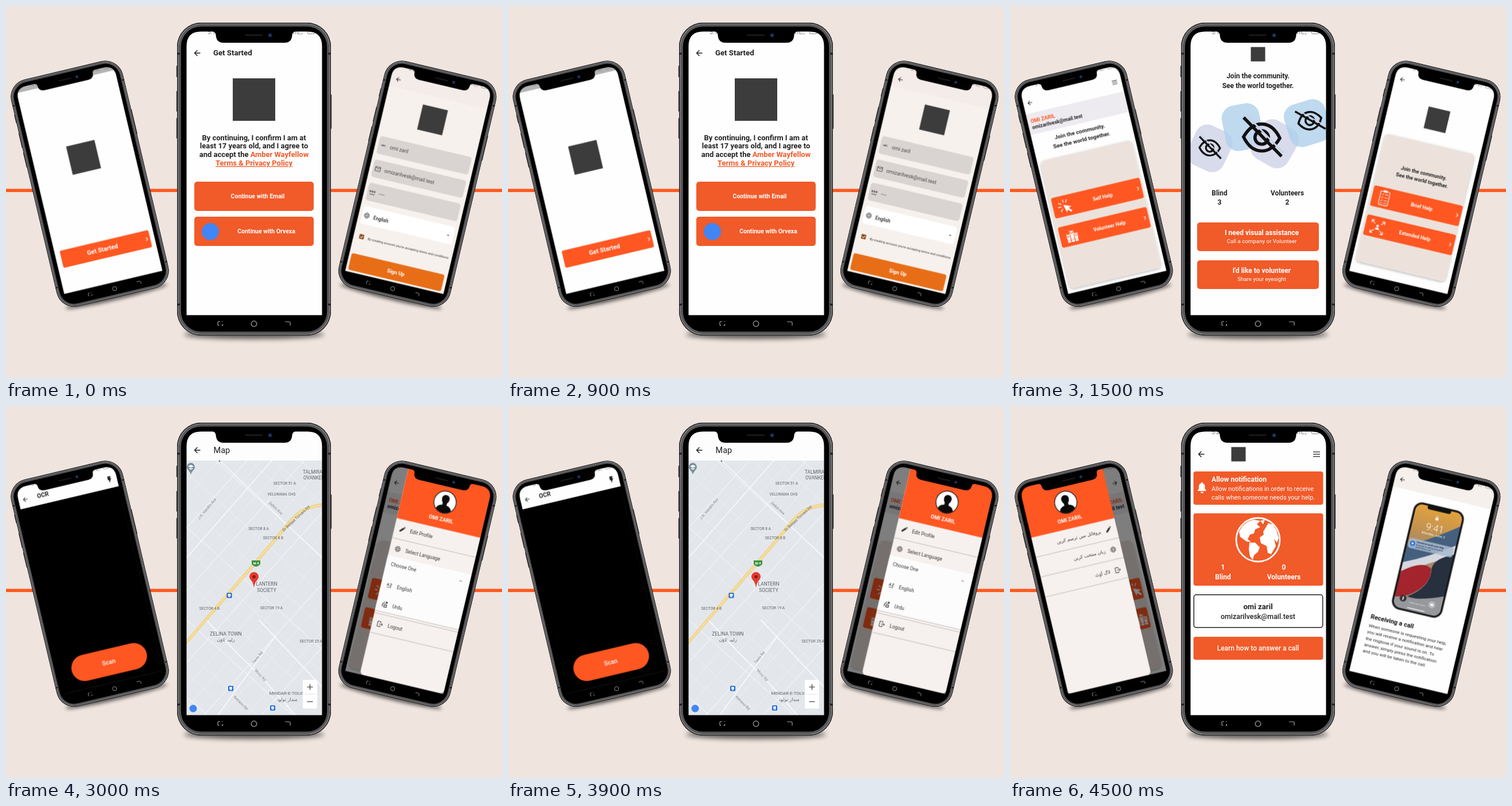
Recreate the animation shown at these times as an HTML page. Size 864 by 648 pixels, loop 6000 ms.

```html
<!DOCTYPE html>
<html lang="en">
<head>
<meta charset="utf-8">
<title>App screens</title>
<style>
html,body{margin:0;width:100%;height:100%;overflow:hidden;background:#efe4de}
svg{display:block;width:100vw;height:100vh;font-family:Roboto,sans-serif}
.page{opacity:0;animation:turn 6s step-end infinite}
@keyframes turn{0%{opacity:1}25%{opacity:0}100%{opacity:0}}
</style>
</head>
<body>
<svg id="stage" viewBox="0 0 864 648" xmlns="http://www.w3.org/2000/svg"></svg>
<script>
const ORANGE = '#f15a29', DEEP = '#ff5722', INK = '#222', LOGO = '#3c3c3c';
const NAME = 'omi zaril', MAIL = 'omizarilvesk@mail.test';

// y is the middle of the line of text
const T = (x, y, s, z, c = INK, w = 400, a = 'middle', more = '') =>
  `<text x="${x}" y="${y}" dy=".355em" font-size="${z}" fill="${c}" font-weight="${w}" text-anchor="${a}" ${more}>${s}</text>`;
const L = (x, y, s, z, c, w) => T(x, y, s, z, c, w, 'start');
const R = (x, y, w, h, c, r = 0, more = '') =>
  `<rect x="${x}" y="${y}" width="${w}" height="${h}" rx="${r}" fill="${c}" ${more}/>`;
const C = (x, y, r, c, more = '') => `<circle cx="${x}" cy="${y}" r="${r}" fill="${c}" ${more}/>`;
const P = (d, c = INK, w = 1.4, more = '') => `<path d="${d}" fill="none" stroke="${c}" stroke-width="${w}" ${more}/>`;
const F = (d, c, more = '') => `<path d="${d}" fill="${c}" ${more}/>`;
const G = (tr, s) => `<g transform="${tr}">${s}</g>`;
const at = (x, y, s) => G(`translate(${x} ${y})`, s);
const SQ = (x, y, s) => R(x - s / 2, y - s / 2, s, s, LOGO);

const arrow = (x, y, d = 1) => at(x, y, G(`scale(${d} 1)`, P('M5.5 0H-4.5M.5-5L-4.5 0 .5 5', INK, 1.4)));
const burger = (x, y) => P(`M${x - 6} ${y - 4}h12m-12 4h12m-12 4h12`, '#444', 1.5);
const chev = (x, y) => P(`M${x - 2} ${y - 4}l4 4-4 4`, '#fff', 1.5);
const status = s => L(351, 45, s, 10, '#777') + L(500, 45, 'm', 10, '#777') + L(509, 48, 'K/s', 5, '#777') +
  R(525, 41, 13, 7.5, 'none', 2, 'stroke="#888"');

const globe = (x, y, c = '#333') => at(x, y, C(0, 0, 6, 'none', `stroke="${c}"`) +
  `<ellipse rx="2.6" ry="6" fill="none" stroke="${c}"/>` + P('M-5.6-2H5.6M-5.6 2H5.6', c, 1));
const pencil = (x, y) => at(x, y, F('M-6 6V3L2-5 5-2-3 6zM3-6L4.5-7.2 7-4.6 5.9-3z', '#333'));
const exit = (x, y) => at(x, y, P('M1-3V-6H-6V6H1V3M-2 0H6M3-3L6 0 3 3', '#333', 1.3));

const cursor = at(-1, 0, F('M-3-3L15 4 8 7 15 14 12 17 5 10 2 16z', '#fff') +
  P('M-7-5l-7-4M-2-8v-7M-8 1h-8M-6 6l-5 6M3-7l4-7', '#fff', 1.8));
const crowd = [[-9, 2], [0, -5], [9, 2]].map(([x, y]) => C(x, y - 3, 2.6, '#fff') +
  F(`M${x - 3.5} ${y + 1}h7V16h-7z`, '#fff') + P(`M${x - 3.7} ${y + 3}v-10M${x + 3.7} ${y + 3}v-9`, '#fff', 1.2)).join('') +
  P('M-13 11H13', DEEP, .8);
const list = R(-11, -15, 22, 32, 'none', 3, 'stroke="#fff" stroke-width="1.4"') + R(-5, -18, 10, 5, '#fff', 2) +
  [-8, -1, 6, 12].map(y => P(`M-8 ${y}l2 2 3-4M0 ${y}h8`, '#fff', 1.3)).join('');
const expand = C(0, -3, 3, '#fff') + F('M-5 6q0-5 5-5t5 5z', '#fff') +
  [0, 90, 180, 270].map(a => G(`rotate(${a})`, P('M7-7l8-8M9-15h6v6', '#fff', 1.7))).join('');

// Orange row with an icon and a chevron
const row = (y, s, icon, rtl) => R(326, y - 24.5, 213, 49, DEEP, 5) + at(rtl ? 522 : 355, y, icon) +
  T(445, y, s, 11.6, '#fff', 700) + (rtl ? '' : chev(530, y));
const card = (x, y, w, h) => R(x, y, w, h, '#ece2db', 10, 'filter="url(#soft)"');
const slogan = (x, y, z, gap) => T(x, y, 'Join the community.', z, INK, 700) +
  T(x, y + gap, 'See the world together.', z, INK, 700);

function home(rtl) {
  const a = rtl ? 'end' : 'start', x = rtl ? 543 : 322;
  return status('5:1') + R(314, 107, 237, 50, '#eeebf0') + (rtl ? arrow(534, 84, -1) : arrow(330, 83) + burger(534, 82)) +
    T(x, 126, NAME.toUpperCase(), 12, DEEP, 700, a) + T(x, 140, MAIL, 11.4, INK, 700, a) +
    slogan(428, 175, 13.2, 20.5) + card(321, 222, 220, 306) +
    row(336, 'Self Help', cursor, rtl) + row(406.5, 'Volunteer Help', crowd, rtl);
}

const shade = R(314, 44, 237, 495, '#000', 0, 'opacity=".5"');
const rule = (x, y) => P(`M${x} ${y}h200`, '#77706d', .6);
const drawer = (x, cx, s) => R(x, 30, 201, 509, '#f6f1ef', 10) + R(x, 30, 201, 133, DEEP) +
  at(cx, 101, C(0, 0, 26, '#fff', 'stroke="#111" stroke-width="1.6"') +
    F('M-18 18Q-16 9-5 7V2Q-9-2-9-8-8-17 0-17T9-8Q9-2 5 2V7Q16 9 18 18A25 25 0 0 1-18 18z', '#0b0b0b')) +
  T(cx, 142, NAME.toUpperCase(), 12, '#fff', 700) + s;

/* first set */
const field = (y, c = '#d9d4d1') => R(322, y - 21, 220, 42, c, 6);
const start = R(314, 44, 237, 12, '#b5b3b3') + status('5:1') + SQ(432, 238, 68) +
  R(327, 438, 213, 41, DEEP, 4) + T(425.5, 458, 'Get Started', 14.4, '#fff', 700) + chev(532, 458);
const consent = status('5:1') + arrow(333, 82) + L(361, 81.5, 'Get Started', 13.2, INK, 700) + SQ(432, 163, 74) +
  ['By continuing, I confirm I am at', 'least 17 years old, and I agree to',
   `and accept the <tspan fill="${ORANGE}">Amber Wayfellow</tspan>`,
   `<tspan fill="${ORANGE}" text-decoration="underline">Terms &amp; Privacy Policy</tspan>`]
    .map((s, i) => T(432, 229 + i * 14.8, s, 12.95, INK, 700)).join('') +
  R(328, 306, 208, 51, ORANGE, 5) + T(438.5, 331.5, 'Continue with Email', 10.5, '#fff', 700) +
  R(328, 367, 208, 51, ORANGE, 5) + C(356, 393, 15, '#4285f4') + T(453.5, 392.5, 'Continue with Orvexa', 10.5, '#fff', 700);
const signup = R(314, 44, 237, 495, '#f6f1ed') + R(314, 44, 237, 50, '#f4ece9') + status('5:1') + arrow(332.6, 74.5) + SQ(432, 148, 60) +
  field(233) + T(334, 232, 'ABC', 5.5, '#444', 700) + L(350, 233.5, NAME, 11.6, '#444') +
  field(289) + P('M328 284.500h12v9.500h-12zl6 5 6-5', '#444', 1.3) + L(350, 290, MAIL, 11.6, '#444') +
  field(345) + T(334, 346, '***', 11, '#333', 700) + P('M328 350h12', '#333', 1.3) + L(350, 345.5, '•••••', 8, '#333') +
  field(401, '#fff') + globe(334, 401) + L(350, 402, 'English', 11, INK, 500) + F('M526 401h7l-3.500 3.500z', '#777') +
  R(328, 446.5, 11, 11, '#8f4a12', 1.5) + P('M330.500 452l2.500 2.500 4-5', '#fff', 1.4) +
  L(348.5, 453, "By creating account you're accepting terms and conditions", 7.5, '#333') +
  R(320, 494, 223, 40, '#e86d17', 5) + T(430.5, 514.5, 'Sign Up', 12, '#fff', 700);

/* second set */
const blob = (x, y, w, h, a, c) => R(-w / 2, -h / 2, w, h, c, 22, `transform="translate(${x} ${y})rotate(${a})" opacity=".8"`);
const eye = (x, y, k, a) => G(`translate(${x} ${y})rotate(${a})scale(${k})`,
  P('M-31 2C-22-15-11-21 0-21S22-15 31 2C22 19 11 25 0 25S-22 19-31 2z', '#111', 5.5) +
  C(0, 2, 11.5, 'none', 'stroke="#111" stroke-width="5.500"') + P('M-31-32L35 31', '#c9d2e8', 3, 'transform="translate(3 -4)"') +
  P('M-32-31L35 33', '#111', 5.5));
const count = (x, y, n, s) => T(x, y, s, 11.9, INK, 700) + T(x, y + 16.5, n, 12, INK, 700);
const choice = (y, s, sub) => R(326, y, 212, 50, ORANGE, 5) + T(438.5, y + 18, s, 12, '#fff', 700) + T(438.5, y + 33, sub, 9.75, '#fff');
const community = status('5:1') + SQ(432, 84, 25) + slogan(432, 122, 12, 17) +
  blob(348, 248, 68, 76, 25, '#cfd2e6') + blob(405, 211, 66, 80, -11, '#b0d0ec') +
  blob(461, 240, 72, 76, 30, '#cfd2e6') + blob(518, 204, 74, 76, -17, '#b0d0ec') +
  eye(438.5, 227, 1.02, 2) + eye(348, 246, .58, 2) + eye(522, 198.5, .66, -14) +
  count(365, 325.5, 3, 'Blind') + count(483, 325.5, 2, 'Volunteers') +
  choice(377, 'I need visual assistance', 'Call a company or Volunteer') + choice(443, "I'd like to volunteer", 'Share your eyesight');
const help = status('5:1') + arrow(332.6, 74.5) + SQ(433, 147.5, 52) + card(323, 206, 215, 306) + slogan(431.5, 275.5, 12, 18) +
  row(354, 'Brief Help', list) + row(424, 'Extended Help', expand);

/* third set */
const scan = status('5:1') + arrow(330.5, 75) + L(359, 74.5, 'OCR', 14, INK, 700) + F('M529 67h8l-2.500 5h3l-6 11v-7h-2.500z', INK) +
  R(314, 95, 237, 444, '#000') + R(344, 459, 180, 62, DEEP, 31) + T(433, 490, 'Scan', 14.4, '#fff', 500);

let streets = '';
for (let i = -9; i < 10; i++) {
  const u = 317 + i * 27 + 6 * Math.sin(i * 3), v = 432 + i * 38 + 9 * Math.sin(i * 5);
  streets += P(`M150 ${u}H720M${v} 40V600`, '#f1f4f7', i % 3 ? .6 : 1.2);
}
const lab = (x, y, s, z = 6.6, a = 0, c = '#5f6368') => T(x, y, s, z, c, 400, 'middle', `transform="rotate(${a} ${x} ${y})"`);
const urdu = (x, y, s, z, a, c) => T(x, y, s, z, c, 400, a, `font-family="'DejaVu Sans',sans-serif"`);
const bus = (x, y) => R(x - 4.5, y - 4.5, 9, 9, '#1a66d6', 1.5) + R(x - 2.5, y - 2.8, 5, 4.4, '#fff', 1) + R(x - 2, y + 2, 4, 1, '#fff');
const map = R(314, 95, 237, 444, '#e3e7eb') + G('rotate(-48 432 317)', streets) +
  P('M350 374L402 430Q432 458 470 500L505 540M368 540L470 400M440 372L551 490', '#f7f8fa', 2) +
  P('M314 265L463 95M372 95L551 265', '#f7f8fa', 1.6) +
  ['#e8c77c', '#f6dc98'].map((c, i) => P('M312 414L350 370C400 312 440 268 486 212C506 187 518 176 553 172', c, 5.5 - i * 1.4)).join('') +
  R(314, 44, 237, 51, '#fdfdfe') + arrow(333, 77) + L(361.5, 77, 'Map', 14.5) + C(372, 96, 1.3, '#666') +
  lab(485.5, 135, 'SECTOR 51 A') + lab(480, 154, 'VELORAMA CHS') + L(517, 115, 'TALMIRA', 8.2, '#5f6368') + L(518, 125.5, 'OVANKEL', 8.2, '#5f6368') +
  lab(440, 214, 'SECTOR 8 A') + lab(465.5, 230, 'SECTOR 8 B') + lab(354.5, 353, 'SECTOR 4 B') + lab(462.5, 352, 'SECTOR 19 A') +
  L(511.5, 410, 'SECTOR 25 A', 6.6, '#5f6368') + lab(454, 310, 'LANTERN', 8.4) + lab(454, 321, 'SOCIETY', 8.4) +
  lab(383, 397, 'ZELINA TOWN', 8.6) + urdu(383, 407, 'زلینہ ٹاؤن', 8, 'middle', '#5f6368') +
  lab(490, 500.5, 'MINDAR-E-TOLVA', 8) + urdu(490, 511, 'مندار تولوہ', 8, 'middle', '#5f6368') +
  lab(350, 179, 'J.K. Vandro Ave', 6.6, -50, '#80868b') + lab(470, 178, 'Zelkin Ave', 6.6, 42, '#80868b') +
  lab(505, 196, 'Dr Belqas Torvani Rd', 6.8, -43) + lab(438, 438, 'Tavlo Rd', 6.6, -50, '#80868b') +
  lab(443, 469, 'Moss Rd', 6.6, 48, '#80868b') + lab(409, 517, 'Ketrano Rd', 6.6, 45, '#80868b') +
  bus(389, 330) + bus(391.5, 492) + bus(464.5, 526) +
  F('M428 269h15v6q-1 3-7.500 5-6.500-2-7.500-5z', '#3f9142') + T(435.5, 274, 'M-9', 5.5, '#fff', 700) +
  F('M432 317Q431 307 426 302.500A8 8 0 1 1 438 302.500Q433 307 432 317z', '#e33b2e') + C(432, 297.5, 2.8, '#8c1a12') +
  F('M322 119Q320 114 317 111A7 7 0 1 1 327 111Q324 114 322 119z', '#78909c') + F('M317 105l5-2.500 5 2.500-5 2.500zM319 107.500l3 1.500 3-1.500v2l-3 1.500-3-1.500z', '#fff') +
  R(517, 477, 25, 50, '#fff', 2) + P('M524.500 489.500h10M529.500 484.500v10M524.500 515h10', '#666', 1.7) + P('M520 502h19', '#e3e3e3', 1) +
  C(326, 527, 6.5, '#4285f4');

const item = (y, s, icon) => icon(368.5, y) + L(387, y, s, 11.3, '#333');
const az = (x, y) => T(x - 3, y - 1, 'A', 9, '#333', 500) + T(x + 4, y - 1, 'Z', 9, '#333', 500) + P(`M${x - 5} ${y + 5}h10l-2-2`, '#333', 1);
const hand = (x, y) => at(x, y, P('M-5 6V-1L-2-3V-6M-1 6V1H5V6zM1-6H6M3.500-7V-2M1-2L6-5', '#333', 1.5));
const menu = home() + shade + drawer(349.5, 451, R(349.5, 252, 202, 132, '#fdfcfd') +
  item(186, 'Edit Profile', pencil) + item(233, 'Select Language', globe) + L(361, 271.5, 'Choose One', 11.3, '#333') +
  P('M526 273.500l3-3 3 3', '#444', 1.2) + item(320, 'English', az) + item(366, 'Urdu', hand) + item(413.5, 'Logout', exit) +
  rule(351, 210) + rule(351, 384) + rule(351, 390) + rule(351, 437));

/* fourth set */
const rtlMenu = home(true) + shade + drawer(313, 412,
  [[186, 'پروفائل میں ترمیم کریں', pencil], [234, 'زبان منتخب کریں', globe], [283, 'لاگ آؤٹ', exit]]
    .map(([y, s, icon]) => icon(494.5, y) + urdu(476, y, s, 10.5, 'end', '#333')).join('') +
  rule(314, 210) + rule(314, 257.5) + rule(314, 305.5));

const world = C(432, 233, 38, 'none', 'stroke="#fff" stroke-width="2.800"') +
  F('M399 219Q406 203 424 198L436 200 430 206 436 211 427 215 425 222 418 224 414 232 420 237 412 236 401 228z', '#fff') +
  F('M417 238L427 238 435 246 432 254 425 260 423 268 418 262 416 250z', '#fff') +
  F('M441 219L450 204 458 207 464 216 468 230 465 238 460 232 463 244 455 258 449 256 447 244 437 239 435 229 442 224z', '#fff') +
  F('M436 200L444 198 441 206z', '#fff');
const profile = status('5:2') + arrow(333, 84) + SQ(398, 84, 25) + burger(534, 84) +
  R(319.5, 114, 226, 58, ORANGE, 4) +
  F('M327 148v-1.500l2-2v-5q.5-4 4-5v-1a1.400 1.400 0 0 1 2.500 0v1q3.500 1 4 5v5l2 2v1.500zM332 149.500h5a2.500 2.500 0 0 1-5 0z', '#fff') +
  L(351, 128, 'Allow notification', 12.2, '#fff', 700) + L(351, 144, 'Allow notifications in order to receive', 10.85, '#fff') +
  L(351, 159, 'calls when someone needs your help.', 10.85, '#fff') +
  R(319.5, 187, 226, 126, ORANGE, 4) + world +
  [[371, 1, 'Blind'], [477, 0, 'Volunteers']].map(([x, n, s]) => T(x, 280.5, n, 12, '#fff', 700) + T(x, 297.5, s, 12, '#fff', 700)).join('') +
  R(320.3, 328.8, 224.4, 57, '#fff', 4, 'stroke="#222" stroke-width="1.500"') +
  T(432, 349, NAME, 13.2, INK, 700) + T(432, 367, MAIL, 12.4, INK, 500) +
  R(319.5, 402, 226, 40, ORANGE, 4) + T(432, 422, 'Learn how to answer a call', 12, '#fff', 500);

const tip = R(314, 44, 237, 51, '#f5f0ec') + status('5:2') + arrow(332.6, 74.5) +
  R(374, 116, 120, 256, '#111', 20, 'stroke="#55565a" stroke-width="1.500"') +
  '<g clip-path="url(#mini)">' + R(378, 120, 112, 248, 'url(#wall)') +
  F('M378 222Q430 196 490 150V206Q436 232 378 268z', '#45607f') +
  F('M378 262Q436 236 490 196V224Q440 246 378 292z', '#d5d8de') +
  F('M378 284Q424 246 446 262 456 300 408 334L378 346z', '#a3242c') +
  F('M490 218Q440 240 448 268 452 306 406 338 460 340 490 322z', '#26303f') +
  F('M378 344Q436 342 490 318V368H378z', '#97989c') + '</g>' +
  R(405, 117, 56, 11, '#111', 5) + R(429, 143, 7, 6, '#fff', 1) + P('M430.500 143v-2a2 2 0 0 1 4 0v2', '#fff', 1) +
  T(432.5, 167, '9:41', 22.5, '#fff', 300) + T(432.5, 183, 'Monday, June 3', 8, '#fff') +
  R(381, 202, 106, 24, '#a9bbd2', 5, 'opacity=".85"') + C(390, 214, 6, '#1667e0') + C(390, 214, 2.6, '#fff') +
  L(399, 209, 'Someone needs your help', 5.6, '#16233a', 700) + L(399, 215, 'A person is calling, answer to', 5, '#16233a') + L(399, 220.5, 'assist them now', 5, '#16233a') +
  C(398, 344, 8, '#3a3235') + P('M398 340v8', '#fff', 2.4) + C(467, 344, 8, '#b9babd') + R(463.5, 341.5, 7, 5, '#fff', 1) +
  T(433, 349, 'swipe up to open', 5, '#eee') + R(412, 362, 42, 1.8, '#fff', 1) +
  L(334, 402, 'Receiving a call', 14.7, '#111', 700) +
  ['When someone is requesting your help,', 'you will receive a notification and hear', 'the ringtone if your sound is on. To',
   'answer, simply press the notification', 'and you will be taken to the call.']
    .map((s, i) => L(334.5, 424 + i * 15.25, s, 10.75)).join('');

/* phones */
const ring = (inset, c, w) => R(298 + inset, 29 + inset, 268 - 2 * inset, 545 - 2 * inset, 'none', 42 - inset, `stroke="${c}" stroke-width="${w}"`);
const body = `<ellipse cx="432" cy="572" rx="122" ry="8" opacity=".6" filter="url(#blur)"/>` +
  R(296.8, 104, 3, 20, '#333', 1) + R(296.8, 148, 3, 36, '#333', 1) + R(296.8, 195, 3, 36, '#333', 1) + R(564.2, 154, 3, 60, '#333', 1) +
  R(298, 29, 268, 545, '#000', 42) + ring(.8, '#2a2a2c', 1.6) + ring(2.4, '#88888a', 1.8) + ring(5, '#58585a', 3.6) +
  P('M298 83h5M561 83h5M298 520h5M561 520h5', '#1c1c1e', 3);
const notch = F('M355 43Q365 44 365.500 50 366 64 379 64H485Q498 64 498.500 50 499 44 509 43z', '#000') +
  R(416, 49.5, 31, 2.6, '#1c1c1f', 1.3) + C(460, 51, 4, '#10182b') + C(460, 51, 1.8, '#2b4f9b');
const nav = P('M373 549.500h-2q-2 0-2 2v3q0 2 2 2M376 549.500h1.500M377.500 554v2.500h-2', '#a5a5a5', 1.2) +
  C(432, 553.5, 4.8, 'none', 'stroke="#a5a5a5" stroke-width="1.200"') + P('M486 550h7q2 0 2 2v4.500', '#a5a5a5', 1.2);

const sets = [[start, home(), scan, rtlMenu], [consent, community, map, profile], [signup, help, menu, tip]];
const tilt = (x, a) => `translate(${x} 309.7)rotate(${a})scale(.745)translate(-432 -301.5)`;
const place = [tilt(146, -13.3), 'translate(0 0)', tilt(716.7, 13.3)];
const phone = (pages, i) => G(place[i], body + '<g clip-path="url(#screen)">' +
  pages.map((s, k) => `<g class="page" style="animation-delay:${k * 1.5 - 6}s">${R(314, 44, 237, 495, '#fefefe')}${s}</g>`).join('') +
  '</g>' + notch + nav);

document.getElementById('stage').innerHTML = `<defs>
  <clipPath id="screen"><path d="M314.500 538.500V70Q314.500 44.500 340 44.500H525Q550.500 44.500 550.500 70V538.500z"/></clipPath>
  <clipPath id="mini"><rect x="378" y="120" width="112" height="248" rx="17"/></clipPath>
  <linearGradient id="wall" x2="0" y2="1"><stop stop-color="#e3a23c"/><stop offset=".35" stop-color="#b08a5c"/><stop offset="1" stop-color="#8d8e93"/></linearGradient>
  <filter id="blur" x="-20%" y="-150%" width="140%" height="400%"><feGaussianBlur stdDeviation="4"/></filter>
  <filter id="soft"><feDropShadow dx="0" dy="2" stdDeviation="3" flood-opacity=".3"/></filter>
</defs>` + R(0, 0, 864, 648, '#efe4de') + R(0, 318.5, 864, 5.6, '#ff5a1f') + sets.map(phone).join('');
</script>
</body>
</html>
```
